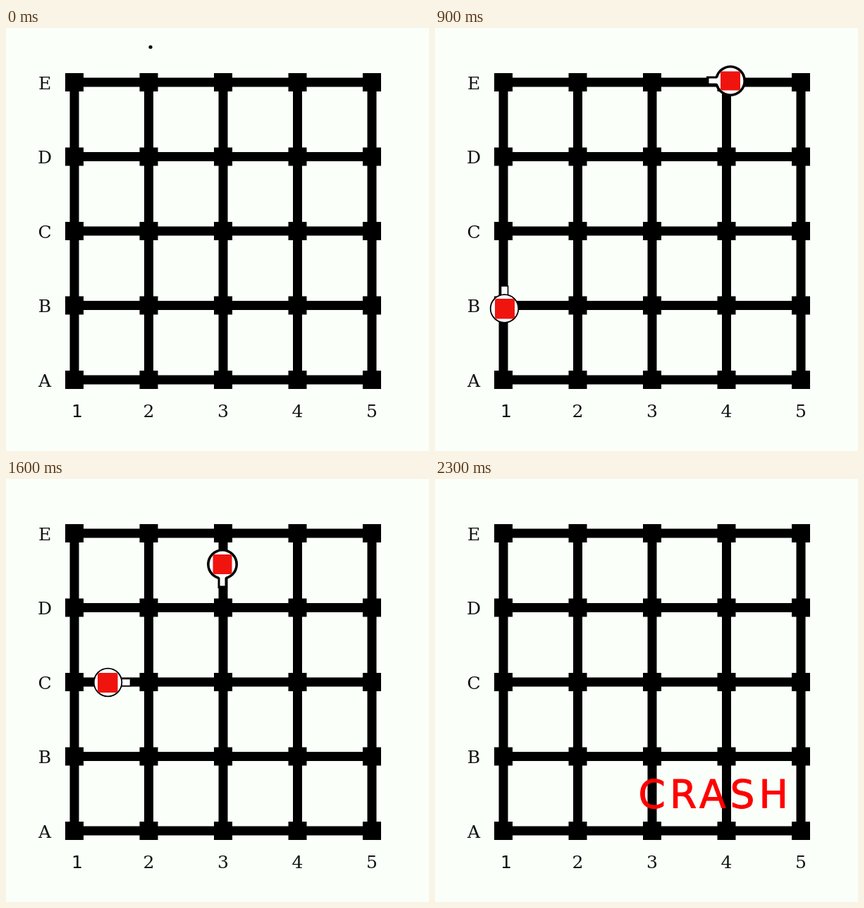
An HTML page that plays this animation: 600 px wide and 600 px high, repeating every 2400 ms.

```html
<!DOCTYPE html>
<html lang="en">
<head>
<meta charset="utf-8">
<title>Robots on a grid</title>
<style>
  html, body { margin: 0; height: 100%; overflow: hidden; background: #fafffa; }
  svg { display: block; width: 600px; height: 600px; }
  .label { font: 25px "DejaVu Serif", "Noto Serif", serif; text-anchor: middle; fill: #111; }
  .sans { font-family: "DejaVu Sans", sans-serif; }
  #crash { font: 55px "DejaVu Sans", sans-serif; letter-spacing: 6px;
           fill: #f00; stroke: #f00; stroke-linejoin: round; }
</style>
</head>
<body>
<svg viewBox="0 0 600 600">
  <g id="grid"></g>
  <circle id="dot" cx="205" cy="27" r="2.6"/>
  <g id="right">
    <circle r="22"/>
    <path d="M-6.5 -34h13v18h-13z"/>
    <circle r="18.4" fill="#fff"/>
    <path d="M-3.5 -30.5h7v11l3 4h-13l3 -4z" fill="#fff"/>
    <rect x="-13.5" y="-14" width="27" height="28" rx="3" fill="#f0140f"/>
  </g>
  <g id="left">
    <path d="M-5 -32h10v16h-10z" fill="#fff" stroke="#000" stroke-width="1.6"/>
    <circle r="19.8" fill="#fff" stroke="#000" stroke-width="1.8"/>
    <rect x="-13.5" y="-14" width="28" height="28.5" rx="3" fill="#f0140f"/>
  </g>
  <text id="crash" x="288.5" y="465.5">CRASH</text>
</svg>
<script>
const LOOP = 2400, CELL = 105.5, X0 = 97, Y0 = 499;
const BEAT = 200, START = 400, TURN = 1300, END = 2200;
const $ = id => document.getElementById(id);

function add(tag, attrs, text = "") {
  const el = document.createElementNS("http://www.w3.org/2000/svg", tag);
  for (const key in attrs) el.setAttribute(key, attrs[key]);
  el.textContent = text;
  $("grid").append(el);
}

const box = (x, y, width, height) => add("rect", { x, y, width, height });

for (let i = 0; i < 5; i++) {
  const x = X0 + i * CELL, y = Y0 - i * CELL;
  box(x - 6.5, Y0 - 4 * CELL, 13, 4 * CELL);
  box(X0, y - 6.5, 4 * CELL, 13);
  for (let j = 0; j < 5; j++) box(x - 13, Y0 - j * CELL - 13, 26, 26);
  add("text", { class: "label", x: 55, y: y + 9.5 }, "ABCDE"[i]);
  add("text", { class: i ? "label" : "label sans", x: i ? x : 101, y: 551.5 }, i + 1);
}

// A robot drives one leg, turns, then drives the next; angles are clockwise from up.
const robots = {
  left: { depart: 400, legs: [
    { x: 98.5, y: 498, angle: 0, stride: 54 },
    { x: 98.5, y: 288.5, angle: 90, stride: 57 }] },
  right: { depart: 600, legs: [
    { x: 519, y: 75, angle: -90, stride: 54 },
    { x: 307, y: 75, angle: 180, stride: 54 }] }
};

const show = (id, on) => $(id).style.display = on ? "" : "none";

// Robots jump about half a cell on each beat, with a shorter first jump.
function place(id, t) {
  const { depart, legs } = robots[id], turned = t >= TURN;
  const { x, y, angle, stride } = legs[+turned];
  const beats = Math.floor((t - (turned ? TURN : START)) / BEAT);
  const jumps = turned ? beats : t < depart ? 0 : Math.max(1, beats);
  const dist = jumps && 46 + stride * (jumps - 1);
  const a = angle * Math.PI / 180;
  show(id, t >= 100 && t < END);
  $(id).setAttribute("transform",
    `translate(${x + dist * Math.sin(a)} ${y - dist * Math.cos(a)}) rotate(${angle})`);
}

const begin = performance.now();

function draw() {
  const t = (performance.now() - begin) % LOOP;
  show("dot", t < 100);
  place("left", t);
  place("right", t);
  show("crash", t >= END);
  requestAnimationFrame(draw);
}
draw();
</script>
</body>
</html>
```
